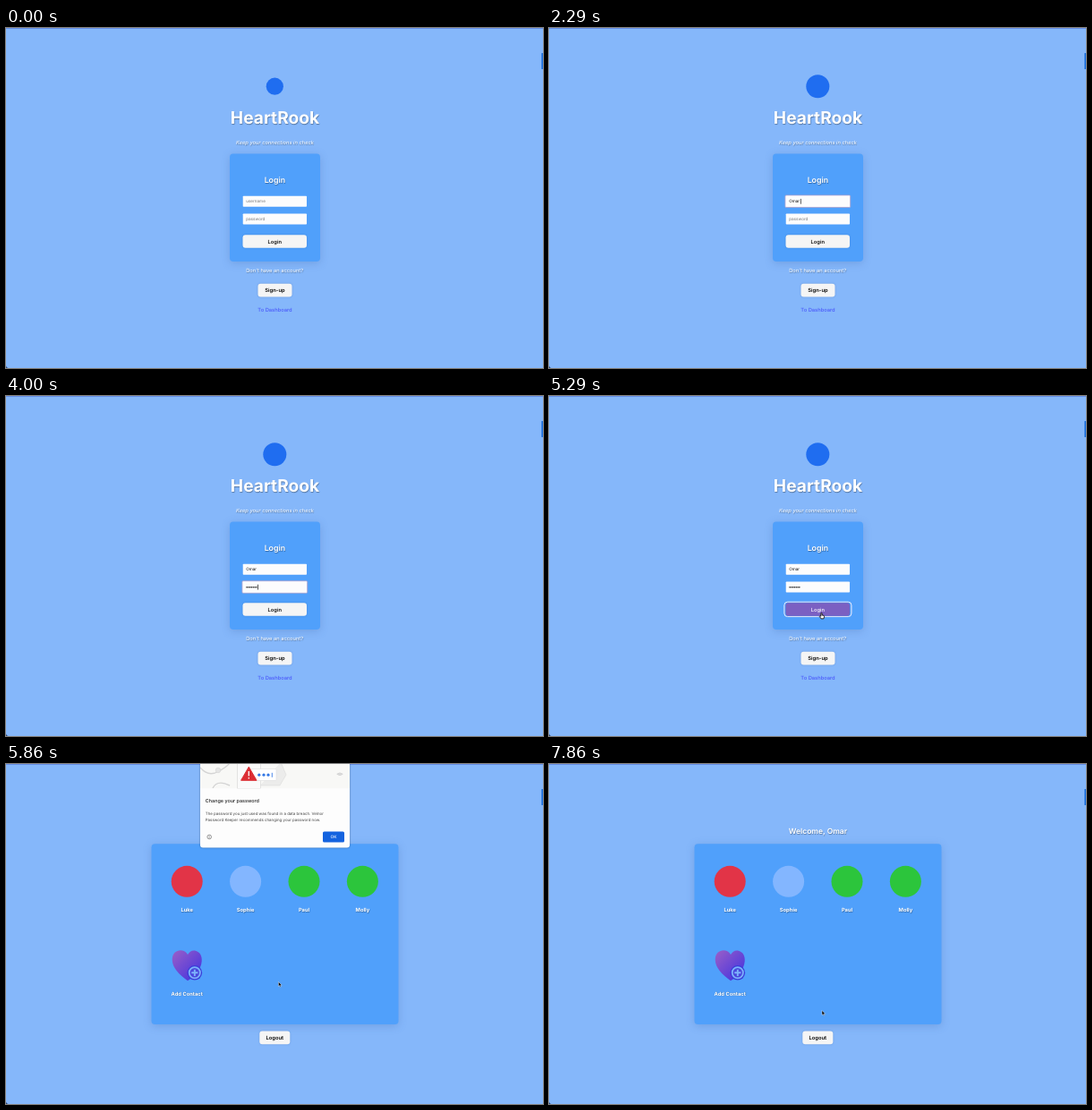
An HTML page for the animation above (8 s loop, 600 by 380 pixels).

```html
<!DOCTYPE html>
<html lang="en">
<head>
<meta charset="utf-8">
<title>Login demo</title>
<style>
  html, body { margin: 0; width: 100%; height: 100%; overflow: hidden; background: #85b7fa; }
  svg { display: block; font-family: Inter, "Open Sans", sans-serif; text-rendering: geometricPrecision; }
  .mid { text-anchor: middle; }
  .card { fill: #50a0fb; filter: drop-shadow(0 2px 5px rgba(30, 70, 140, .2)); }
  .button { filter: drop-shadow(0 .5px .8px rgba(30, 70, 140, .25)); }
  .glow { fill: #fff; text-shadow: .5px .7px 1px rgba(0, 0, 0, .35); }
  .bold { font-weight: 600; }
</style>
</head>
<body>
<svg width="600" height="380" viewBox="0 0 600 380">
  <defs>
    <linearGradient id="violet" x1="0" y1="0" x2="1" y2="1">
      <stop offset="0" stop-color="#9a5fc8"/>
      <stop offset="1" stop-color="#3d30e0"/>
    </linearGradient>
    <clipPath id="banner"><rect x="217" width="167" height="27.5"/></clipPath>
  </defs>
  <rect width="600" height="380" fill="#85b7fa"/>
  <rect width="600" height=".7" fill="#587bdd"/>
  <rect x="598.3" y="28" width="2" height="18" rx=".6" fill="#1d70dc"/>
  <path d="M0 377.5Q.3 379.7 2.5 380H0Z" fill="#203a68"/>

  <g id="loginPage">
    <circle id="logo" cx="300.3" cy="65.2" fill="#1f6df0"/>
    <text class="mid glow" x="300.5" y="107.3" font-size="19.2" font-weight="650">HeartRook</text>
    <text class="mid glow" x="300.5" y="130.2" font-size="5.75" font-style="italic">Keep your connections in check</text>
    <rect class="card" x="250" y="140.5" width="101" height="120.5" rx="4"/>
    <text class="mid glow bold" x="300.4" y="173" font-size="8.8">Login</text>
    <g id="userField"></g>
    <g id="passField"></g>
    <rect id="loginRing" x="262.9" y="230.2" width="75" height="16.4" rx="3.6" fill="none" stroke="#f4f2ff" stroke-width="1"/>
    <rect id="loginButton" class="button" x="264.5" y="231.3" width="71.5" height="14.4" rx="3"/>
    <text id="loginLabel" class="mid" x="300.3" y="240.7" font-size="5.75">Login</text>
    <text class="mid glow" x="300.2" y="273.4" font-size="5.75">Don't have an account?</text>
    <rect class="button" x="281.5" y="285.8" width="38" height="14.8" rx="3" fill="#f5f5f5"/>
    <text class="mid bold" x="300.4" y="295.3" font-size="5.8">Sign-up</text>
    <text class="mid" x="300.5" y="317" font-size="5.75" font-weight="500" fill="#4a58fa">To Dashboard</text>
  </g>

  <g id="dashboard">
    <text class="mid glow bold" x="300.4" y="78" font-size="8.5">Welcome, Omar</text>
    <rect class="card" x="162.5" y="89.3" width="276" height="201.7" rx="4"/>
    <g id="contacts"></g>
    <path d="M203 242.3C193 235 185.7 227.5 185.7 218.5C185.7 211.5 190.5 208 195.5 208.2C199.5 208.3 201.5 210.3 203 213C205 209.8 208 207.8 211.8 208.8C217 210.2 219.2 215 218.7 220.5C218 230 210 238 203 242.3Z" fill="url(#violet)"/>
    <circle cx="210.8" cy="233.3" r="8.3" fill="#3a3cd8"/>
    <circle cx="210.8" cy="233.3" r="6.1" fill="#4a48dc" stroke="#7db2fc" stroke-width="1.8"/>
    <path d="M207.2 233.3h7.2M210.8 229.7v7.2" stroke="#7db2fc" stroke-width="1.9"/>
    <text class="mid glow" x="202.2" y="258.6" font-size="5.8" font-weight="700">Add Contact</text>
    <rect class="button" x="283.3" y="298.5" width="34" height="14.8" rx="3" fill="#f5f5f5"/>
    <text class="mid bold" x="300.3" y="308.1" font-size="5.8">Logout</text>
  </g>

  <g id="dialog">
    <path d="M217 0H384V90.5Q384 93.5 381 93.5H220Q217 93.5 217 90.5Z" fill="#fdfdfd" style="filter:drop-shadow(0 .6px 1px rgba(0,0,0,.35))"/>
    <g clip-path="url(#banner)">
      <rect x="217" width="167" height="27.5" fill="#f8f8f6"/>
      <g fill="none" stroke="#d4d4d4">
        <path d="M217 4Q226 15 238 8T250 -2M231 27Q236 17 250 24" stroke-width="1.4"/>
        <circle cx="237" cy="7" r="2.8" fill="#e5e5e5" stroke-width=".6"/>
        <path d="M284 24H306L313 12L307 -2" fill="#ececeb" stroke-width=".5"/>
        <rect x="258.5" y="-3" width="26" height="30.5" fill="#fafafa" stroke-width=".6"/>
        <path d="M369.8 11.3Q373 8.6 376.2 11.3Q373 14 369.8 11.3Z" fill="#ddd"/>
      </g>
      <rect x="273" y="5.5" width="29" height="13" rx="1" fill="#fff" stroke="#dedede" stroke-width=".6"/>
      <g fill="#3478e5">
        <circle cx="282.8" cy="12.2" r="1.6"/><circle cx="288" cy="12.2" r="1.6"/><circle cx="293" cy="12.2" r="1.6"/>
        <rect x="296.8" y="9.8" width=".9" height="5"/>
      </g>
      <path d="M271.3 3.2L280 18.3H262.6Z" fill="#dc2e34" stroke="#dc2e34" stroke-linejoin="round"/>
      <path d="M271.3 8v5.5M271.3 15v1.5" stroke="#fff" stroke-width="1.3"/>
    </g>
    <text x="222.8" y="43.4" font-size="5.45" font-weight="500" fill="#222">Change your password</text>
    <g font-size="4.42" fill="#444">
      <text x="222.8" y="56.9">The password you just used was found in a data breach. Velnor</text>
      <text x="222.8" y="64.4">Password Keeper recommends changing your password now.</text>
    </g>
    <circle cx="227.2" cy="81.5" r="2.3" fill="none" stroke="#555" stroke-width=".6"/>
    <path d="M227.2 81.2v1.5M227.2 80v.6" stroke="#555" stroke-width=".6"/>
    <rect id="okButton" x="354" y="75.5" width="24" height="12" rx="1.6"/>
    <text class="mid" x="366" y="83.3" font-size="4.7" font-weight="500" fill="#fff">OK</text>
  </g>

  <g id="cursor">
    <path id="arrow" d="M0 0V5L1.2 4L2 5.7L2.8 5.4L2.1 3.7H3.6Z" stroke="#fff" stroke-width=".4"/>
    <path id="hand" d="M-.6 -1.8Q0 -2.5 .5 -1.8V.4L2.6 .9Q3.3 1.2 3 2.3L2.4 4.4H-.5L-2.2 1.9Q-2 1-1.2 1.4L-.6 1.8Z" fill="#fff" stroke="#111" stroke-width=".9"/>
  </g>
</svg>
<script>
const LOOP = 8000, STEP = 1000 / 7;
const $ = id => document.getElementById(id);
const show = (id, on) => $(id).style.display = on ? "" : "none";
const clamp = v => Math.min(1, Math.max(0, v));
const ease = v => v * v * (3 - 2 * v);
const progress = (t, from, to) => ease(clamp((t - from) / (to - from)));

const USER = "Omar", DOTS = 7;
const FOCUS_USER = 1000, FOCUS_PASS = 2570, CLICK_LOGIN = 5140;
const PAGE_SWITCH = 5570, DIALOG_OPEN = 5710, DIALOG_CLOSE = 7140;

// Cursor stops: time, x, y
const PATH = [
  [4280, 299, 215], [4850, 304.5, 245.5], [5710, 304.5, 243.5],
  [5860, 304.5, 243.5], [6710, 363.3, 84.2], [7140, 363.3, 84.2], [7860, 305, 275.5]
];

$("contacts").innerHTML = [
  ["Luke", "#e23447"], ["Sophie", "#83b6ff"], ["Paul", "#2cc53c"], ["Molly", "#2cc53c"]
].map(([name, color], i) => {
  const x = 202.2 + i * 65.4;
  return `<circle cx="${x}" cy="131.3" r="17.5" fill="${color}"/>
    <text class="mid glow" x="${x}" y="165" font-size="5.8" font-weight="700">${name}</text>`;
}).join("");

function field(id, y, focused, content, contentWidth) {
  const ring = focused
    ? `<rect x="263.9" y="${y - .6}" width="72.8" height="13.6" rx="1" fill="#eeeafa" stroke="#a6a2cf" stroke-width=".8"/>` : "";
  const caret = focused
    ? `<rect x="${268.5 + contentWidth}" y="${y + 3.4}" width=".7" height="5.8" fill="#111"/>` : "";
  $(id).innerHTML = `${ring}<rect x="264.7" y="${y + .2}" width="71.3" height="12" rx=".8" fill="#fcfcfd"/>${content}${caret}`;
}

const fieldText = (text, y, color) =>
  `<text x="268.2" y="${y + 7.9}" font-size="4.6" fill="${color}">${text}</text>`;

function drawFields(t) {
  const letters = USER.slice(0, Math.floor(clamp((t - 1400) / 700) * USER.length));
  const dots = Math.floor(clamp((t - 2700) / 1150) * DOTS);
  const bullets = Array.from({ length: dots }, (_, i) =>
    `<circle cx="${269 + i * 1.8}" cy="213.7" r=".75" fill="#111"/>`).join("");
  field("userField", 187.5, t >= FOCUS_USER && t < FOCUS_PASS,
    letters ? fieldText(letters, 187.5, "#111") : fieldText("username", 187.5, "#777"), letters.length * 3.1);
  field("passField", 207.3, t >= FOCUS_PASS && t < CLICK_LOGIN,
    dots ? bullets : fieldText("password", 207.3, "#777"), dots * 1.8);
}

function cursorAt(t) {
  const next = PATH.findIndex(p => p[0] > t);
  if (next < 0) return PATH[PATH.length - 1].slice(1);
  const a = PATH[Math.max(0, next - 1)], b = PATH[next];
  const k = progress(t, a[0], b[0]);
  return [a[1] + (b[1] - a[1]) * k, a[2] + (b[2] - a[2]) * k];
}

function draw(t) {
  const onLogin = t < PAGE_SWITCH;
  const dialogOpen = t >= DIALOG_OPEN && t < DIALOG_CLOSE;
  const [x, y] = cursorAt(t);
  const visible = t >= PATH[0][0];
  const overLogin = visible && onLogin && y > 231;
  const overOk = dialogOpen && x > 354 && y < 88;

  show("loginPage", onLogin);
  show("dashboard", !onLogin);
  show("dialog", dialogOpen);
  show("loginRing", t >= CLICK_LOGIN);
  $("logo").setAttribute("r", 9.6 + 3.4 * progress(t, 0, 430));
  $("loginButton").setAttribute("fill", overLogin ? "#7b60c2" : "#f5f5f5");
  $("loginLabel").setAttribute("fill", overLogin ? "#fff" : "#111");
  $("loginLabel").setAttribute("font-weight", overLogin ? 500 : 600);
  $("okButton").setAttribute("fill", overOk ? "#3b6fc4" : "#1463df");
  if (onLogin) drawFields(t);

  show("cursor", visible);
  show("hand", overLogin || overOk);
  show("arrow", !(overLogin || overOk));
  $("cursor").setAttribute("transform", `translate(${x} ${y})`);
}

function tick() {
  const t = performance.now() % LOOP;
  draw(Math.floor((t + 4) / STEP) * STEP);
  requestAnimationFrame(tick);
}
tick();
</script>
</body>
</html>
```
